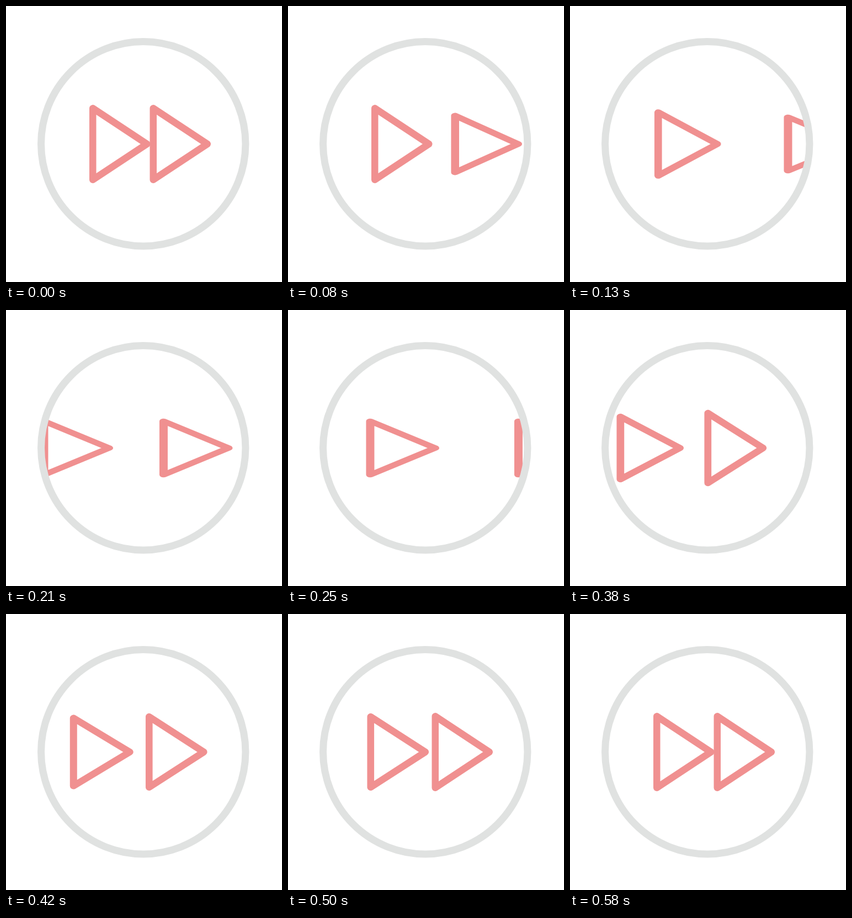
Recreate the animation shown at these times as an HTML page. Size 500 px wide and 500 px high, loop 620 ms.

```html
<!DOCTYPE html>
<html>
<head>
<meta charset="utf-8">
<style>
  html, body { margin: 0; height: 100%; overflow: hidden; background: #fff; }
  svg { display: block; width: 100%; height: 100%; }
</style>
</head>
<body>
<svg viewBox="0 0 500 500">
  <clipPath id="disc"><circle cx="248.75" cy="249.75" r="183"/></clipPath>
  <g clip-path="url(#disc)" fill="none" stroke="#f09090" stroke-width="12.5" stroke-linejoin="round">
    <path class="arrow" d="M-49-64.75V64.75L49 0Z"/>
    <path class="arrow" d="M-49-64.75V64.75L49 0Z"/>
  </g>
  <circle cx="248.75" cy="249.75" r="185.2" fill="none" stroke="#e0e2e1" stroke-width="13"/>
</svg>
<script>
const LOOP = 620, STEP = 1000 / 24, LAG = 2;
// Offset from rest per step: shoot out right, re-enter from the left, settle.
const shift = [0, 7, 44, 138, 270, -188, -108, -61, -33, -16, -7, -2, 0];
// 0 = relaxed, 1 = fully flattened and stretched
const squash = [0, .46, .82, 1, 1, 1, 1, .5, .2, .1, .05, .01, 0];
const [back, front] = document.querySelectorAll('.arrow');

function pose(arrow, restX, step) {
  const i = Math.max(0, Math.min(step, shift.length - 1));
  const sx = 1 + .2 * squash[i], sy = 1 - .25 * squash[i];
  arrow.setAttribute('transform', `translate(${restX + shift[i]} 250) scale(${sx} ${sy})`);
}

function draw() {
  // The small lead matches step times rounded to 10 ms.
  const step = Math.floor((performance.now() % LOOP + 4) / STEP);
  pose(front, 315.75, step);
  pose(back, 206.25, step - LAG);
  requestAnimationFrame(draw);
}
draw();
</script>
</body>
</html>
```
